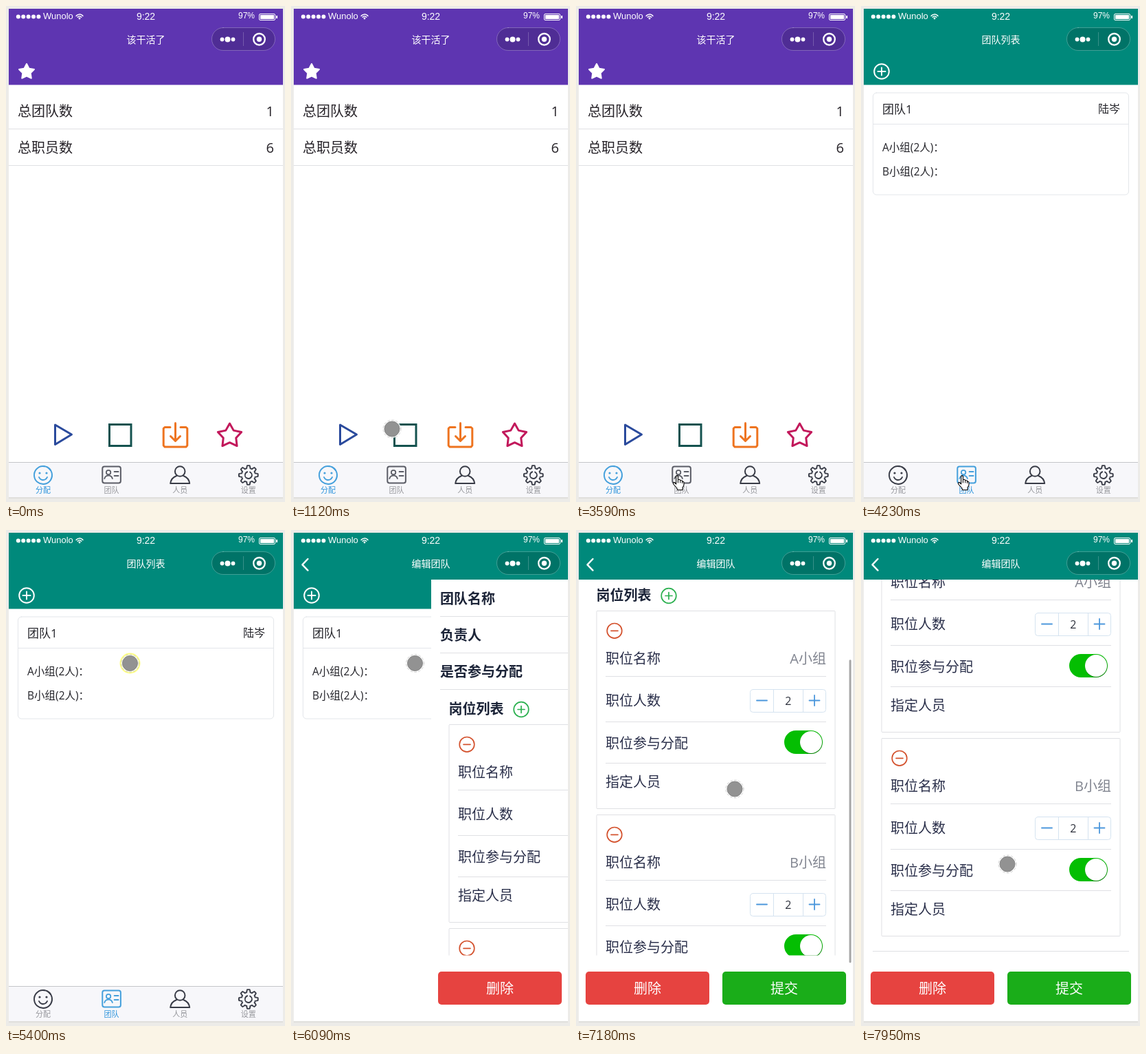
Recreate the animation shown at these times as an HTML page with a canvas. Size 406 by 720 pixels, loop 8 s.

```html
<!DOCTYPE html>
<html lang="zh-CN">
<head>
<meta charset="utf-8">
<title>团队分配</title>
<style>
html, body { margin: 0; width: 100%; height: 100%; overflow: hidden; background: #ecebe8; }
canvas { display: block; width: 406px; height: 720px; }
</style>
</head>
<body>
<canvas id="stage"></canvas>
<script>
const W = 406, H = 720, LOOP = 8000;
const SANS = '"Open Sans", "Noto Sans CJK SC", "Noto Sans CJK", sans-serif';
const ARIAL = '"Liberation Sans", sans-serif';
const INK = '#1c2438', GREY = '#80848f', RULE = '#dfe0e4';
const PURPLE = '#5e35b1', TEAL = '#00897b', BLUE = '#45a0dc';

const canvas = document.getElementById('stage');
const ctx = canvas.getContext('2d');
const dpr = window.devicePixelRatio || 1;
canvas.width = W * dpr;
canvas.height = H * dpr;

// ---------- drawing helpers ----------
function text(s, x, y, size, color, align = 'left', weight = 400, font = SANS) {
  ctx.font = `${weight} ${size}px ${font}`;
  ctx.textAlign = align;
  ctx.textBaseline = 'alphabetic';
  ctx.fillStyle = color;
  ctx.fillText(s, x, y + size * 0.37);
}
function rect(x, y, w, h, color) {
  ctx.fillStyle = color;
  ctx.fillRect(x, y, w, h);
}
function paint(fill, stroke, width = 1) {
  if (fill) { ctx.fillStyle = fill; ctx.fill(); }
  if (stroke) { ctx.strokeStyle = stroke; ctx.lineWidth = width; ctx.stroke(); }
}
function box(x, y, w, h, r, fill, stroke, width) {
  ctx.beginPath();
  ctx.roundRect(x, y, w, h, r);
  paint(fill, stroke, width);
}
function circle(x, y, r, fill, stroke, width) {
  ctx.beginPath();
  ctx.arc(x, y, r, 0, Math.PI * 2);
  paint(fill, stroke, width);
}
function arc(x, y, r, from, to, color, width) {
  ctx.beginPath();
  ctx.arc(x, y, r, from * Math.PI, to * Math.PI);
  paint(null, color, width);
}
function poly(pts, close, fill, stroke, width) {
  ctx.beginPath();
  pts.forEach(([x, y], i) => i ? ctx.lineTo(x, y) : ctx.moveTo(x, y));
  if (close) ctx.closePath();
  paint(fill, stroke, width);
}
const line = (x1, y1, x2, y2, color, width) => poly([[x1, y1], [x2, y2]], false, null, color, width);
const rule = (x1, x2, y, color = RULE) => rect(x1, y, x2 - x1, 1, color);

function star(x, y, r, ratio, fill, stroke, width) {
  const pts = [];
  for (let i = 0; i < 10; i++) {
    const a = i * Math.PI / 5 - Math.PI / 2, d = i % 2 ? r * ratio : r;
    pts.push([x + d * Math.cos(a), y + d * Math.sin(a)]);
  }
  poly(pts, true, fill, stroke, width);
}
function signCircle(x, y, color, plus, width = 1.7, arm = 5) {
  circle(x, y, 10.8, null, color, width);
  line(x - arm, y, x + arm, y, color, width);
  if (plus) line(x, y - arm, x, y + arm, color, width);
}

// ---------- chrome ----------
function header(title, color, bottom, back) {
  rect(4, 4, 399, bottom - 4, color);
  for (let i = 0; i < 5; i++) circle(17.8 + i * 7.4, 15.5, 3, '#fff');
  text('Wunolo', 54, 14, 13, '#fff', 'left', 400, ARIAL);
  for (const r of [6.4, 3.6]) arc(107, 18.5, r, 1.22, 1.78, '#fff', 1.5);
  circle(107, 18, 1.4, '#fff');
  text('9:22', 203.5, 15, 14, '#fff', 'center', 400, ARIAL);
  text('97%', 338, 14, 12, '#fff', 'left', 400, ARIAL);
  box(368.5, 11.5, 23, 9, 1.5, null, '#fff', 1);
  rect(370, 13, 20, 6, '#fff');
  rect(393, 14, 2, 4, '#fff');
  text(title, 203.5, 49, 14, '#fff', 'center');
  box(299.5, 31.5, 92, 33, 16.5, 'rgba(0,0,0,.16)', 'rgba(255,255,255,.25)', 1);
  rect(345, 38, 1, 20, 'rgba(255,255,255,.22)');
  circle(314.5, 48.5, 2.9, '#fff');
  circle(322.5, 48.5, 4, '#fff');
  circle(330.5, 48.5, 2.9, '#fff');
  circle(368.5, 48.3, 8.3, null, '#fff', 2.3);
  circle(368.5, 48.3, 3.7, '#fff');
  if (back) poly([[24.5, 42], [16.5, 50.3], [24.5, 58.6]], false, null, '#fff', 2.4);
}

const tabIcons = [
  (x, c) => {
    arc(x, 681, 13, -.28, 1.55, c, 2);
    arc(x, 681, 13, 1.5, 1.82, c, 2);
    circle(x - 5, 678, 1.6, c);
    circle(x + 5, 678, 1.6, c);
    arc(x, 681.5, 6.5, .12, .88, c, 1.8);
  },
  (x, c) => {
    box(x - 13.3, 668.5, 26.6, 24, 3, null, c, 2);
    circle(x - 4.5, 677, 3.2, null, c, 1.8);
    arc(x - 4.5, 687.5, 6, 1.08, 1.92, c, 1.8);
    line(x + 4, 676, x + 10, 676, c, 1.8);
    line(x + 4, 682, x + 10, 682, c, 1.8);
  },
  (x, c) => {
    circle(x, 675.5, 7.3, null, c, 2);
    ctx.beginPath();
    ctx.moveTo(x - 5, 682);
    ctx.quadraticCurveTo(x - 13, 685, x - 14, 693);
    ctx.lineTo(x + 14, 693);
    ctx.quadraticCurveTo(x + 13, 685, x + 5, 682);
    paint(null, c, 2);
  },
  (x, c) => {
    const pts = [];
    for (let i = 0; i < 96; i++) {
      const a = i * Math.PI / 48;
      const r = 12 + 1.9 * Math.max(-1, Math.min(1, 2 * Math.cos(8 * a)));
      pts.push([x + r * Math.cos(a), 681 + r * Math.sin(a)]);
    }
    poly(pts, true, null, c, 1.9);
    arc(x, 681, 5, -.35, 1.4, c, 1.9);
  }
];
function tabBar(active) {
  rect(4, 662, 399, 51, '#f7f7fa');
  rule(4, 403, 662, '#c4c5c9');
  ['分配', '团队', '人员', '设置'].forEach((label, i) => {
    const x = 54 + i * 99.6, on = i === active;
    tabIcons[i](x, on ? BLUE : i === 1 ? '#5b5d66' : '#393c47');
    text(label, x, 703, 11, on ? '#2b93dc' : '#96979c', 'center');
  });
}

// ---------- pages ----------
function assignPage() {
  header('该干活了', PURPLE, 114.5);
  star(30, 95.5, 11.5, .52, '#fff', '#fff', 2);
  [['总团队数', '1', 152.5], ['总职员数', '6', 205.5]].forEach(([label, n, y]) => {
    text(label, 17, y, 20, '#262228');
    text(n, 390, y, 20, '#262228', 'right');
  });
  rule(4, 403, 178);
  rule(4, 403, 231);
  poly([[71.5, 608], [95.5, 622], [71.5, 636.5]], true, null, '#2a4a9c', 3);
  ctx.lineJoin = 'miter';
  ctx.strokeStyle = '#14524f';
  ctx.lineWidth = 3;
  ctx.strokeRect(150.5, 607.5, 31.5, 31);
  ctx.lineJoin = 'round';
  const orange = '#ee7420';
  poly([[239, 611.5], [231, 611.5], [229.2, 613.3], [229.2, 638], [231, 640], [262, 640],
    [263.8, 638], [263.8, 613.3], [262, 611.5], [254, 611.5]], false, null, orange, 3);
  line(246.5, 605.5, 246.5, 630, orange, 3);
  poly([[239.5, 624.5], [246.5, 631.5], [253.5, 624.5]], false, null, orange, 3);
  star(325.5, 624, 18, .54, null, '#c2185b', 3);
  tabBar(0);
}

function teamPage(editing) {
  header(editing ? '编辑团队' : '团队列表', TEAL, 114.5, editing);
  signCircle(30, 95, '#fff', true, 2, 5.5);
  box(17.5, 126, 372, 148, 5, '#fff', '#e3e6ea', 1);
  rule(18, 389, 171, '#e3e6ea');
  text('团队1', 31, 149.5, 17, '#24242a');
  text('陆岑', 377, 149.5, 16, '#24242a', 'right');
  text('A小组(2人)：', 31, 205, 15.5, '#24242a');
  text('B小组(2人)：', 31, 240.5, 15.5, '#24242a');
  if (!editing) tabBar(1);
}

function toggle(x, y) {
  box(x, y, 56, 34, 17, '#04be02');
  circle(x + 39.2, y + 17.6, 16.3, 'rgba(0,0,0,.32)');
  circle(x + 39, y + 17, 16, '#fff');
}
function stepper(y) {
  box(253.5, y - 16.5, 110, 33, 4, '#fff', '#d5e3f0', 1);
  rect(287, y - 16, 1, 32, '#d5e3f0');
  rect(330, y - 16, 1, 32, '#d5e3f0');
  line(263, y - .5, 278, y - .5, '#4c97dc', 1.8);
  line(339.5, y - .5, 354.5, y - .5, '#4c97dc', 1.8);
  line(347, y - 8, 347, y + 7, '#4c97dc', 1.8);
  text('2', 308.7, y, 16, '#30343f', 'center');
}
function postCard(top, name) {
  box(30, top + .5, 347, 287, 1, '#fff', RULE, 1);
  signCircle(56, top + 29.3, '#d4532f', false);
  [['职位名称', 70], ['职位人数', 130.5], ['职位参与分配', 193], ['指定人员', 249]]
    .forEach(([label, dy]) => text(label, 43, top + dy, 20, '#2a2f4a'));
  text(name, 364, top + 70, 20, GREY, 'right');
  for (const dy of [95, 161, 221]) rule(43, 364, top + dy);
  stepper(top + 131);
  toggle(303, top + 174);
}
function button(x, label, color) {
  box(x, 641, 180, 48, 5, color);
  text(label, x + 90, 665.5, 20, '#fff', 'center');
}
function formPage(shift, scroll, barAlpha) {
  ctx.save();
  ctx.beginPath();
  ctx.rect(4, 72, 399, 641);
  ctx.clip();
  ctx.translate(shift, 0);
  rect(4, 72, 399, 641, '#fff');

  ctx.save();
  ctx.beginPath();
  ctx.rect(4, 72, 399, 545.5);
  ctx.clip();
  ctx.translate(0, -scroll);
  [['团队名称', 99.5], ['负责人', 152.5], ['是否参与分配', 205.5]]
    .forEach(([label, y]) => text(label, 17, y, 20, INK, 'left', 700));
  text('团队1', 390, 99.5, 20, GREY, 'right');
  text('陆岑', 390, 152.5, 20, GREY, 'right');
  toggle(329.5, 187.5);
  for (const y of [125, 178, 231, 887]) rule(17, 390, y);
  text('岗位列表', 29.5, 260, 20, INK, 'left', 700);
  signCircle(135, 260.5, '#2bb04f', true);
  postCard(282, 'A小组');
  postCard(578, 'B小组');
  ctx.restore();

  button(14, '删除', '#e64340');
  button(213, '提交', '#1aad19');
  if (barAlpha) box(397.5, 74 + 191 * scroll / 276, 3, 440, 1.5, `rgba(0,0,0,${barAlpha})`);
  ctx.restore();
}

// ---------- pointer ----------
// Each move: start, end, number of steps, evenly spaced waypoints.
const moves = [
  [430, 1200, 11, [[305, 673], [270, 625], [190, 583], [128, 584], [144, 601], [150, 627]]],
  [1290, 2050, 11, [[132, 632], [100, 641], [84, 653], [105, 668], [130, 672], [151, 674]]],
  [2430, 3210, 11, [[168, 680], [194, 694], [220, 702], [241, 698], [225, 692], [184, 691]]],
  [3290, 3590, 5, [[170, 690], [158, 686], [150, 683], [147, 682], [146, 682]]],
  [4540, 4920, 6, [[150, 640], [149, 540], [155, 400], [165, 290], [176, 215], [180.5, 193.5]]],
  [6480, 6860, 6, [[205, 210], [232, 230], [237, 275], [236, 320], [233, 352], [231, 376]]],
  [7870, 7950, 2, [[211, 440], [213, 485]]]
];
function pointerAt(t) {
  const move = moves.filter(m => t >= m[0]).pop();
  if (!move) return null;
  const [t0, t1, n, pts] = move;
  const step = Math.min(n - 1, Math.floor((t - t0 + 6) / ((t1 - t0) / (n - 1))));
  const u = step / (n - 1) * (pts.length - 1);
  const i = Math.min(pts.length - 2, Math.floor(u)), f = u - i;
  return [0, 1].map(k => pts[i][k] + (pts[i + 1][k] - pts[i][k]) * f);
}
function hand(x, y) {
  ctx.save();
  ctx.translate(Math.round(x) - 5.5, Math.round(y) - 1.5);
  poly([[5.2, 2], [6.5, 1], [8, 2], [8, 7], [10.5, 7], [11.3, 8], [13.5, 8.2], [14.2, 9.2],
    [16, 10], [16.5, 11.5], [16.5, 15], [14.5, 19], [14.5, 22], [7, 22], [6.5, 19.5],
    [1.2, 13.5], [1, 11.5], [2.6, 11], [5.2, 13.5]], true, '#fff', '#000', 1.1);
  line(8, 7, 8, 11.5, '#000', 1);
  line(11.2, 8, 11.2, 11.5, '#000', 1);
  line(14.1, 9, 14.1, 12, '#000', 1);
  ctx.restore();
}
function touch(x, y) {
  circle(x, y, 13, 'rgba(255,255,255,.85)');
  ctx.setLineDash([3, 3]);
  circle(x, y, 12.9, null, 'rgba(120,120,120,.5)', .7);
  ctx.setLineDash([]);
  circle(x, y, 11, '#929292', '#858585', 1);
}
function pointer(t) {
  const p = pointerAt(t);
  if (!p) return;
  const pressed = (t >= 3840 && t < 4070) || (t >= 5400 && t < 5620);
  if (pressed) circle(p[0], p[1], 15, 'rgba(255,255,0,.47)');
  const onBar = t < 5620 && p[1] > 662;
  (onBar ? hand : touch)(p[0], p[1]);
}

// ---------- timeline ----------
function held(t, start, keys) {
  let value = start;
  for (const [at, v] of keys) if (t >= at) value = v;
  return value;
}
function draw(t) {
  ctx.setTransform(dpr, 0, 0, dpr, 0, 0);
  ctx.lineJoin = ctx.lineCap = 'round';
  rect(0, 0, W, H, '#ecebe8');
  rect(4, 713, 399, 2, '#e0dfdc');
  rect(4, 4, 399, 709, '#fff');
  if (t < 4230) assignPage();
  else teamPage(t >= 5620);
  if (t >= 6020) {
    formPage(
      held(t, 345, [[6090, 200], [6170, 45], [6250, 0]]),
      held(t, 0, [[7090, 70], [7165, 165], [7240, 245], [7320, 276]]),
      held(t, 0, [[7090, .35], [7640, .25], [7720, .15], [7870, .07], [7950, 0]])
    );
  }
  pointer(t);
}

const begin = performance.now();
function tick() {
  draw((performance.now() - begin) % LOOP);
  requestAnimationFrame(tick);
}
tick();
</script>
</body>
</html>
```
